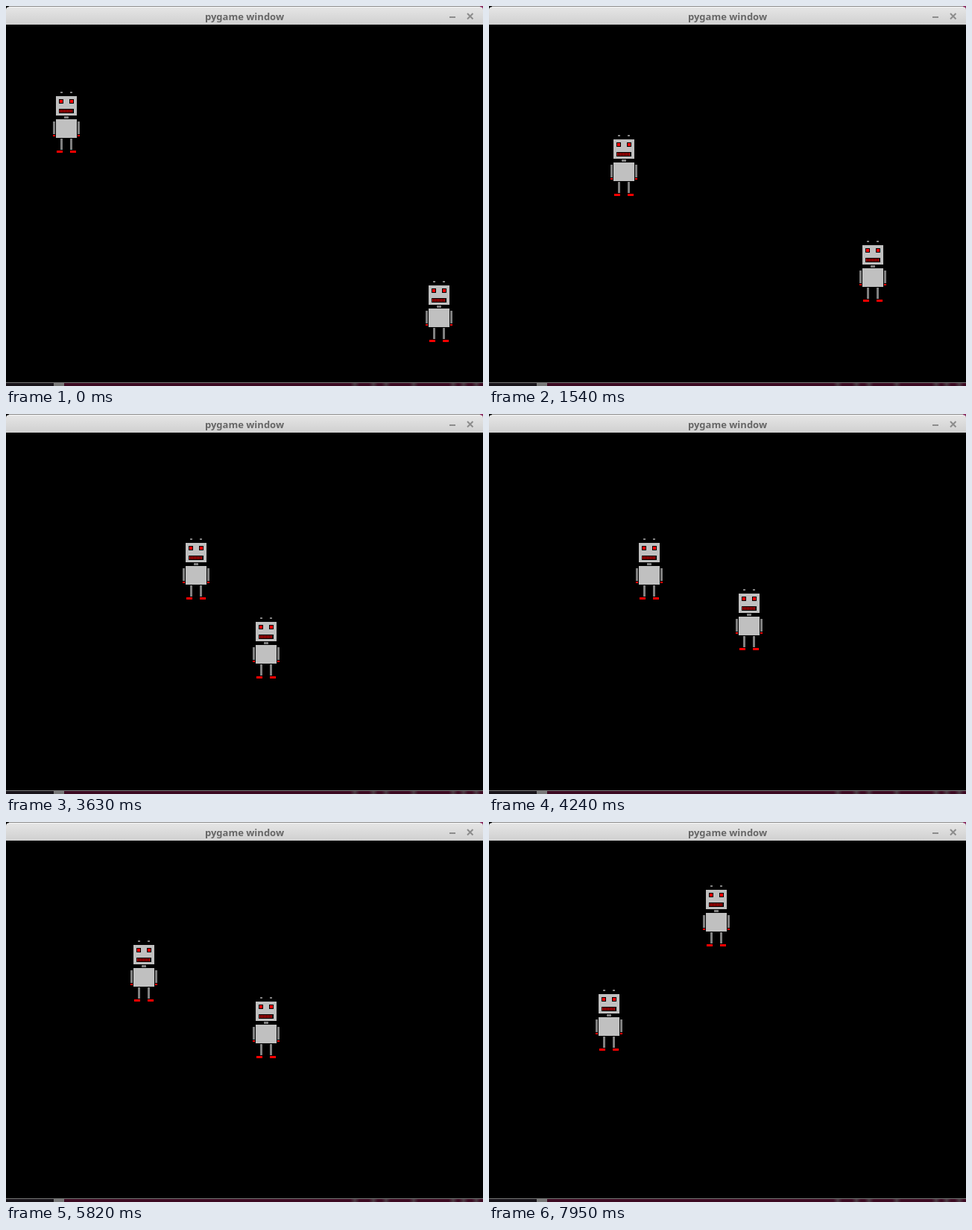
An HTML page that plays this animation: 640 px wide and 510 px high, repeating every 8000 ms.

```html
<!DOCTYPE html>
<html lang="en">
<head>
<meta charset="utf-8">
<title>pygame window</title>
<style>
  html, body { margin: 0; width: 100%; height: 100%; overflow: hidden; background: #000; }
  svg { display: block; width: 640px; height: 510px; }
  text { font: bold 13px "Noto Sans", "Open Sans", sans-serif; text-anchor: middle; }
</style>
</head>
<body>
<svg viewBox="0 0 640 510" shape-rendering="crispEdges">
  <defs>
    <linearGradient id="bar" x2="0" y2="1">
      <stop offset="0" stop-color="#e6e6e6"/>
      <stop offset="1" stop-color="#d0d0d0"/>
    </linearGradient>
    <linearGradient id="blob">
      <stop offset="0" stop-color="#4a3a42" stop-opacity="0"/>
      <stop offset=".5" stop-color="#4a3a42"/>
      <stop offset="1" stop-color="#4a3a42" stop-opacity="0"/>
    </linearGradient>
    <g id="robot">
      <g fill="#808080">
        <path id="antennas" d="M10 0h3v2h-3zM23 0h3v2h-3z"/>
        <path id="neck" d="M15 33h6v3h-6z"/>
        <path id="arms" d="M0 40h3v17h-3zM33 40h3v17h-3z"/>
        <path id="legs" d="M10 63h3v15h-3zM23 63h3v15h-3z"/>
      </g>
      <path fill="#c0c0c0" d="M4 6h28v26h-28zM4 37h28v25h-28z"/>
      <path d="M8 10h6v6h-6zM22 10h6v6h-6zM8 23h20v6h-20z"/>
      <g fill="#f00">
        <path id="eyes" d="M9 11h4v4h-4zM23 11h4v4h-4z"/>
        <path id="hands" d="M0 58h3v2h-3zM33 58h3v2h-3z"/>
        <path id="feet" d="M5 79h8v3h-8zM23 79h8v3h-8z"/>
      </g>
      <path id="teeth" stroke="#f00" stroke-width="4" stroke-dasharray="1" d="M9 26h18"/>
    </g>
  </defs>

  <rect width="640" height="510"/>
  <rect x="636" width="4" height="4" fill="#8a2a60"/>
  <path fill="url(#bar)" shape-rendering="auto" d="M0 25V5Q0 1 5 1H635Q640 1 640 5V25z"/>
  <path fill="#8c8c8c" d="M4 0h632v1h-632z"/>
  <path fill="#f4f4f4" d="M4 1h632v1h-632z"/>
  <text x="320" y="19" fill="#666">pygame window</text>
  <path fill="#8c8c8c" d="M595 14h8v2h-8z"/>
  <path stroke="#8c8c8c" stroke-width="2" shape-rendering="auto" d="M619 10l7.5 7.5M626.5 10l-7.5 7.5"/>

  <use id="a" href="#robot"/>
  <use id="b" href="#robot"/>

  <path fill="#777" d="M0 505h640v1h-640z"/>
  <path fill="#18141a" d="M0 506h64v4h-64z"/>
  <path fill="#777" d="M64 506h14v4h-14z"/>
  <path fill="#3c0a22" d="M78 506h562v4h-562z"/>
  <g id="blobs" fill="url(#blob)"></g>
</svg>
<script>
const LOOP = 8000;
const SPEED = 0.137; // px per ms while a key is held
const STEP = 2;
const $ = id => document.getElementById(id);

// A key press: start time, axis, signed distance
const press = (at, axis, dist) => ({ at, axis, dist });

const robots = [
  {
    el: $("a"), x: 63, y: 115,
    keys: [
      press(50, "y", 58), press(480, "x", 100),
      press(1900, "y", -26), press(2110, "x", 30), press(2530, "x", 44),
      press(3050, "y", 20), press(3950, "x", -70), press(4615, "y", 78),
      press(5190, "y", -128), press(6130, "x", -62),
      press(6870, "x", 38), press(7150, "y", 108)
    ]
  },
  {
    el: $("b"), x: 563, y: 369,
    keys: [
      press(330, "x", -66), press(1140, "y", -54),
      press(1560, "x", -166), press(1900, "y", 4),
      press(3290, "y", -84), press(5980, "y", -48),
      press(6410, "x", -44), press(6800, "y", -102)
    ]
  }
];

// Distance walked so far, in whole steps
function walked({ at, dist }, t) {
  const d = Math.min(Math.abs(dist), Math.max(0, t - at) * SPEED);
  return Math.sign(dist) * STEP * Math.round(d / STEP);
}

function place({ el, x, y, keys }, t) {
  const pos = { x, y };
  for (const key of keys) pos[key.axis] += walked(key, t);
  el.setAttribute("transform", `translate(${pos.x} ${pos.y})`);
}

$("blobs").innerHTML = [462, 487, 504, 541, 594, 608, 625]
  .map(x => `<rect x="${x}" y="506" width="12" height="4"/>`).join("");

const start = performance.now();

function draw(now) {
  const t = Math.max(0, now - start) % LOOP;
  robots.forEach(robot => place(robot, t));
  requestAnimationFrame(draw);
}
draw(start);
</script>
</body>
</html>
```
